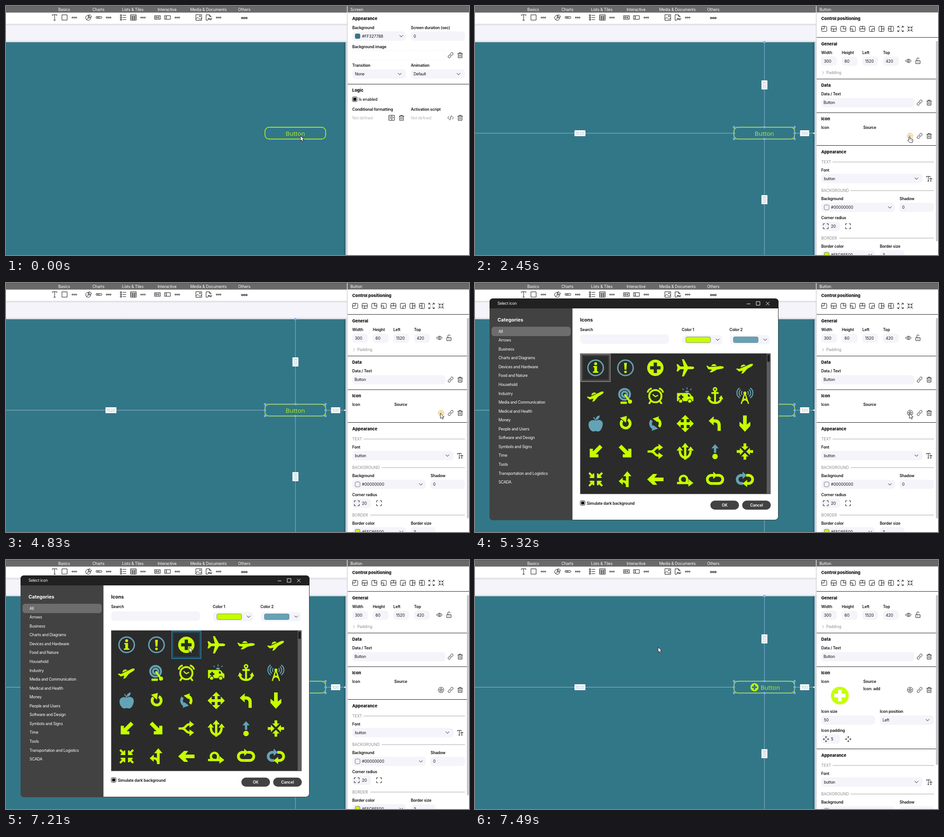
Recreate the animation shown at these times as an HTML page. Size 1019 by 549 pixels, loop 8 s.

```html
<!DOCTYPE html>
<html lang="en">
<head>
<meta charset="utf-8">
<title>Button icon picker</title>
<style>
html, body { margin: 0; width: 100%; height: 100%; overflow: hidden; background: #fff; }
svg { display: block; }
text { font: 400 8.6px Inter, sans-serif; letter-spacing: -.25px; fill: #111; white-space: pre; }
.n { letter-spacing: 0; }
.l { font-weight: 600; letter-spacing: -.15px; }
.m { font-weight: 500; letter-spacing: -.06px; }
.h { font-weight: 800; font-size: 9.2px; letter-spacing: -.05px; }
.H { font-weight: 700; font-size: 10.6px; letter-spacing: 0; }
.w { fill: #fff; }
.t { font-size: 8.7px; letter-spacing: -.13px; fill: #fff; }
.c { text-anchor: middle; }
.g { fill: #b4b4b8; }
.s { fill: #8c8c8c; letter-spacing: 0; }
.d { fill: #9fb2cf; letter-spacing: 0; text-anchor: middle; }
.b { font: 400 13.3px "Open Sans", sans-serif; letter-spacing: 0; fill: #bdf312; }
.i { fill: none; stroke: #161616; stroke-width: 1; stroke-linejoin: round; stroke-linecap: round; }
</style>
</head>
<body>
<svg id="stage" width="1019" height="549" viewBox="0 0 1019 549"></svg>
<script>
const LIME = '#c6ff00', BLUE = '#64a3b5', TEAL = '#327788', FIELD = '#f4f4fa', DARK = '#2b2b2b';

const text = (x, y, s, cls = '') =>
  `<text x="${x}" y="${y + 3.1}" class="${cls}">${s.replace(/&/g, '&amp;').replace(/</g, '&lt;')}</text>`;
const rect = (x, y, w, h, fill, r = 0, more = '') =>
  `<rect x="${x}" y="${y}" width="${w}" height="${h}" rx="${r}" fill="${fill}" ${more}/>`;
const fill = (d, c = LIME) => `<path d="${d}" fill="${c}" fill-rule="evenodd"/>`;
const line = (d, c = LIME, w = 6) => `<path d="${d}" fill="none" stroke="${c}" stroke-width="${w}"/>`;
const disc = (x, y, r, c = LIME) => `<circle cx="${x}" cy="${y}" r="${r}" fill="${c}"/>`;
const ring = (x, y, r, c = LIME, w = 3) =>
  `<circle cx="${x}" cy="${y}" r="${r}" fill="none" stroke="${c}" stroke-width="${w}"/>`;
const at = (x, y, s, more = '') => `<g transform="translate(${x} ${y}) ${more}">${s}</g>`;
const turn = (a, s) => `<g transform="rotate(${a})">${s}</g>`;
const flip = s => `<g transform="scale(-1 1)">${s}</g>`;
const group = (id, s) => `<g id="${id}">${s}</g>`;
const four = s => [0, 90, 180, 270].map(a => turn(a, s)).join('');

// Thin line icons, centred on 0,0
const icons = {
  chev: 'M-3.5-1.8L0 1.8L3.5-1.8',
  right: 'M-1.5-3L1.5 0L-1.5 3',
  trash: 'M-5.3-3.6H5.3M-2-3.6V-5.6H2V-3.6M-4.2-3.6V5.6H4.2V-3.6M-1.4-1V3.2M1.4-1V3.2',
  link: 'M-1.6 1.2a2.6 2.6 0 0 0 3.7 0l2.6-2.6a2.6 2.6 0 0 0-3.7-3.7l-1.2 1.2M1.6-1.2a2.6 2.6 0 0 0-3.7 0l-2.6 2.6a2.6 2.6 0 0 0 3.7 3.7l1.2-1.2',
  eye: 'M-6 0Q0-8 6 0Q0 8-6 0ZM-2 0a2 2 0 0 0 4 0a2 2 0 0 0-4 0',
  lock: 'M-4.5-.5H4.5V6H-4.5ZM-2.5-.5V-4A2.4 2.4 0 0 1 2.3-4.5M0 2V3.5',
  star: 'M-6 0a6 6 0 0 0 12 0a6 6 0 0 0-12 0M0-3.6L1.1-1.2L3.6-1L1.8.8L2.3 3.3L0 2L-2.3 3.3L-1.8.8L-3.6-1L-1.1-1.2Z',
  font: 'M-6-3.6V-5.3H2.4V-3.6M-1.8-5.3V5.2M-3.2 5.2H-.4M1.4.6V-.8H6V.6M3.7-.8V5.2M2.8 5.2H4.6',
  code: 'M-3.4-3L-6.4 0L-3.4 3M3.4-3L6.4 0L3.4 3M1.5-5L-1.5 5',
  cond: 'M-6-5.5H6V5.5H-6ZM0-5.5V5.5M-4.2-2H-2M-4.2 1H-2M2-2.5L4.2-.5L2 1.5',
  corner: 'M-5.5-2.3V-5.5H-2.3M2.3-5.5H5.5V-2.3M5.5 2.3V5.5H2.3M-2.3 5.5H-5.5V2.3',
  pad: 'M-1.8-4.2L0-6L1.8-4.2M0-6V-2.6M-1.8 4.2L0 6L1.8 4.2M0 6V2.6M-4.2-1.8L-6 0L-4.2 1.8M-6 0H-2.6M4.2-1.8L6 0L4.2 1.8M6 0H2.6',
  grow: 'M-6-3V-6H-3M3-6H6V-3M6 3V6H3M-3 6H-6V3M-6-6L-2-2M6-6L2-2M6 6L2 2M-6 6L-2 2',
  shrink: 'M-5-1.8H-1.8V-5M5-1.8H1.8V-5M-5 1.8H-1.8V5M5 1.8H1.8V5M-6-6L-2-2M6-6L2-2M6 6L2 2M-6 6L-2 2',
  T: 'M-5-4V-6H5V-4M0-6V6M-2 6H2',
  box: 'M-5.5-5.8H5.5V5.8H-5.5Z',
  pie: 'M-1-5A5.6 5.6 0 1 0 4.6 1L-1 1ZM1.2-6A5 5 0 0 1 6-1H1.2ZM-1 1L-4.6 4.8',
  bar: 'M-5-2H5Q6.5-2 6.5 0Q6.5 2 5 2H-5Q-6.5 2-6.5 0Q-6.5-2-5-2ZM-4 0H1',
  list: 'M-6-6H-3.4V-3.4H-6ZM-6-1.3H-3.4V1.3H-6ZM-6 3.4H-3.4V6H-6ZM-.8-4.7H6M-.8 0H6M-.8 4.7H6',
  table: 'M-6-6H6V6H-6ZM-6-3H6M-6 0H6M-6 3H6M-2-3V6M2-3V6',
  ok: 'M-6.2-4H6.2V4H-6.2ZM-4-1.6H-1.2V1.6H-4ZM1.4-2V2M4.2-2L1.6 0L4.2 2',
  input: 'M-6.2-4H6.2V4H-6.2ZM-3-2V2M-4-2H-2M-4 2H-2',
  image: 'M-6.2-6.2H6.2V6.2H-6.2ZM-6 3Q-3-2 0 2T6 1M1.4-2.8a1.2 1.2 0 0 0 2.4 0a1.2 1.2 0 0 0-2.4 0',
  pdf: 'M-2 6H-5.6V-6H1.5L5-2.5V-.5M1.5-6V-2.5H5M-1 5.5V2H.8V3.6H-1M2.5 2V5.5Q4.5 5.5 4.3 3.6Q4.2 2 2.5 2M6 5.5V2H7.2',
  dots: 'M-5.4 0a1.4 1.4 0 0 0 2.8 0a1.4 1.4 0 0 0-2.8 0M-1.4 0a1.4 1.4 0 0 0 2.8 0a1.4 1.4 0 0 0-2.8 0M2.6 0a1.4 1.4 0 0 0 2.8 0a1.4 1.4 0 0 0-2.8 0'
};
const icon = (name, x, y, more = '') => at(x, y, `<path class="i" d="${icons[name]}"/>`, more);

const field = (x, y, w, value = '', chevX = 0, textX = x + 6) =>
  rect(x, y - 10.3, w, 20.6, FIELD, 7) + text(textX, y, value, /\d/.test(value) ? 'n' : '') +
  (chevX ? icon('chev', chevX, y) : '');
const swatch = (x, y, c) => rect(x + .5, y - 5.3, 10.6, 10.6, c, 2.5, 'stroke="#555" stroke-width=".8"');
const rule = (y, x = 752, c = '#222') => rect(x, y - .5, (x > 752 ? 1010 : 1019) - x, 1, c);
const section = (y, s, x) => text(762, y, s, 's') + rule(y, x, '#a4a4a4');
const check = (x, y) => rect(x - 5.2, y - 5.2, 10.4, 10.4, '#fff', 2.5, 'stroke="#111" stroke-width="1"') +
  rect(x - 3.3, y - 3.3, 6.6, 6.6, '#000', 1);

// Editor
const menus = [[128, 'Basics'], [203.5, 'Charts'], [279, 'Lists & Tiles'], [354.5, 'Interactive'],
  [445.5, 'Media & Documents'], [524.5, 'Others']];
const tools = [['T', 107], ['box', 129], ['pie', 182], ['bar', 204.5], ['list', 258], ['table', 280.5],
  ['ok', 333.5], ['input', 355.5], ['image', 424.5], ['pdf', 446]];
const editor =
  rect(0, 0, 752, 549, FIELD) +
  rect(0, 39, 751, 5, 'url(#shade)') + rect(0, 76, 748, 4, 'url(#edge)') +
  rect(0, 15, 751, 24.5, '#fff') +
  rect(0, 80, 747.5, 469, TEAL) + rect(743.5, 80, 4, 469, '#2b6678') +
  rect(747.5, 78, 3.5, 471, '#d3d8de') +
  rect(0, 0, 1019, 14.5, '#696969') + rect(0, 0, 1019, 1, '#555') +
  menus.map(([x, s]) => text(x, 7.5, s, 't c')).join('') +
  tools.map(([n, x]) => icon(n, x, 25.3)).join('') +
  [150.5, 226, 301.5, 377, 468].map(x => icon('dots', x, 25.5)).join('') +
  icon('dots', 524.5, 26.5, 'scale(1.2)') +
  rect(570, 267.4, 133.6, 26, 'none', 9, 'stroke="#bdf312" stroke-width="1.6"') +
  rect(752, 14.5, 267, 535, '#fff') + rect(750.5, 0, 1, 549, '#c4c4c8') + rect(750.5, 0, 1, 14.5, '#eee');

// Plus badge
const plus = fill('M-18 0a18 18 0 0 0 36 0a18 18 0 0 0-36 0ZM-3.6-11.5H3.6V-3.6H11.5V3.6H3.6V11.5H-3.6V3.6H-11.5V-3.6H-3.6Z');

const caption = text(636.8, 282.7, 'Button', 'b c');
const captionIcon = at(615.2, 280.5, plus, 'scale(.5)') + text(628.7, 282.7, 'Button', 'b');

// Selection guides
const tag = (x, y, s, a = 0) => at(x, y, rect(-10 - (s.length - 3) * 2, -6.5, 20 + (s.length - 3) * 4, 13, '#fff') +
  text(0, .2, s, 'd'), `rotate(${a})`);
const handle = (x, y) => rect(x - 2.2, y - 2.2, 4.4, 4.4, '#7db0e6');
const guides =
  rect(636.5, 79, 1, 188, '#86b8e0') + rect(636.5, 294, 1, 255, '#94b3c8') +
  rect(0, 280, 570, 1, '#94b9c6') + rect(704, 280, 42, 1, '#94b9c6') +
  rect(570, 267.2, 133.5, 26, 'none', 0, 'stroke="#94bedd" stroke-width=".9"') +
  tag(231, 280.5, '1520') + tag(725.5, 280.5, '100') + tag(637, 174, '420', 90) + tag(637, 427, '600', 90) +
  [570, 637, 703.3].flatMap(x => [267.2, 280.5, 293.3].map(y => x == 637 && y == 280.5 ? '' : handle(x, y))).join('') +
  handle(637, 79.5) + disc(746, 280.5, 1.8, '#f2f5fa');

// Right panel: nothing selected
const screenPanel =
  text(758, 8, 'Screen', 't') + text(762, 28.3, 'Appearance', 'h') +
  text(762, 47.5, 'Background', 'l') + text(891, 47.5, 'Screen duration (sec)', 'l') +
  field(762, 66.5, 118.5, '#FF327788', 870, 783.5) + swatch(768, 66.5, TEAL) + field(891, 66.5, 119, '0') +
  text(762, 89.5, 'Background image', 'l') +
  rect(762, 98.5, 205, 20, '#fff', 7, 'stroke="#ececf0" stroke-dasharray="2 2"') +
  icon('link', 978.5, 108.5) + icon('trash', 999.5, 108.5) +
  text(762, 131.3, 'Transition', 'l') + text(891, 131.3, 'Animation', 'l') +
  field(762, 150, 118.5, 'None', 866.5) + field(891, 150, 119, 'Default', 996) + rule(172.3) +
  text(762, 186.3, 'Logic', 'h') + check(767.6, 205.6) + text(776, 206, 'Is enabled', 'm') +
  text(762, 228.3, 'Conditional formatting', 'l') + text(891, 228.3, 'Activation script', 'l') +
  text(762, 247, 'Not defined', 'g') + text(891, 247, 'Not defined', 'g') +
  icon('cond', 849, 246.5) + icon('trash', 870.5, 246.5) + icon('code', 978.5, 246.5) + icon('trash', 999.5, 246.5);

// Right panel: button selected
const anchors = ['M0-6V0H-6', 'M-6 0H6M0 0V6', 'M0-6V0H6', 'M-6 0H0V6', 'M-6 0H6M0-6V0', 'M0 6V0H6', 'M0-6V6M0 0H6', 'M0-6V6M-6 0H0'];
const numbers = [[762, 'Width', '300'], [807.3, 'Height', '60'], [852.5, 'Left', '1520'], [898, 'Top', '420']];
const lower =
  rule(307.5) + text(762, 322, 'Appearance', 'h') + section(344, 'TEXT', 787) +
  text(762, 362, 'Font', 'l') + field(762, 380.5, 223, 'button', 971.5) + icon('font', 999.5, 381) +
  section(407, 'BACKGROUND', 827) + text(762, 424.7, 'Background', 'l') + text(934.5, 424.7, 'Shadow', 'l') +
  field(762, 444, 162, '#00000000', 913, 783.5) + swatch(768, 444, FIELD) + field(934, 444, 76, '0') +
  text(762, 466.7, 'Corner radius', 'l') + field(762, 485.7, 41.5, '20', 0, 783.5) +
  icon('corner', 772, 485.5) + icon('corner', 821, 485.5) +
  section(511.7, 'BORDER', 802) + text(762, 529.5, 'Border color', 'l') + text(891, 529.5, 'Border size', 'l') +
  field(762, 548.5, 118.5, '#FFC6FF00', 870, 783.5) + swatch(768, 548.5, LIME) + field(891, 548.5, 54, '3');
const iconFields =
  text(854.5, 283.5, 'Icon: add', 'l') + at(803, 299, plus, 'scale(1.09)') +
  text(762, 334, 'Icon size', 'l') + text(891, 334, 'Icon position', 'l') +
  field(762, 353, 118.5, '50') + field(891, 353, 119, 'Left', 996) +
  text(762, 376, 'Icon padding', 'l') + field(762, 395, 41.5, '5', 0, 783.5) +
  icon('pad', 772.5, 395) + icon('pad', 821.5, 395);
const buttonPanel =
  text(758, 8, 'Button', 't') + text(762, 28.3, 'Control positioning', 'h') +
  anchors.map((d, i) => at(768.5 + 21 * i, 50.5,
    rect(-5.6, -5.6, 11.2, 11.2, 'none', 1.5, 'class="i"') + `<path class="i" d="${d}"/>`)).join('') +
  icon('grow', 936.5, 50.5) + icon('shrink', 957.5, 50.5) + rule(69.3) +
  text(762, 83.7, 'General', 'h') +
  numbers.map(([x, s, v]) => text(x, 102.5, s, 'l') + field(x, 121.8, 34.5, v)).join('') +
  icon('eye', 954, 121) + icon('lock', 975, 121) +
  at(766, 147, `<path class="i" style="stroke:#999" d="${icons.right}"/>`) + text(773, 147, 'Padding', 's') + rule(161) +
  text(762, 175, 'Data', 'h') + text(762, 194, 'Data / Text', 'l') + field(762, 213.3, 205, 'Button', 0, 767) +
  icon('link', 978.5, 213) + icon('trash', 999.5, 213) + rule(235.2) +
  text(762, 249.2, 'Icon', 'h') + text(762, 268, 'Icon', 'l') + text(854.5, 268, 'Source', 'l') +
  group('star', icon('star', 957.5, 286.5)) + icon('link', 978.5, 286.5) + icon('trash', 999.5, 286.5) +
  group('iconFields', iconFields) + group('lower', lower) +
  `<rect id="thumb" x="1014.5" y="77" width="4" height="442" rx="2" fill="#c3c3c7"/>`;

// Icon library
const arrow = 'M-4-18H4V2L12-4V5L0 18L-12 5V-4L-4 2Z';
const diag = 'M-13 13V-6H-6V0L9-15L15-9L0 6H6V13Z';
const jet = fill('M-19-4Q-17-6-13-2L5-3Q16-5 19-2Q20 1 15 2L4 4L-7 10H-12L-7 4L-15 3Z') + fill('M-9-4L-5-8H0L4-4Z');
const swirl = c => line('M-8-7A11 11 0 0 0-4 10', c, 6) + fill('M-8 16L6 11L-5 3Z', c);
const fork = line('M-17 0H-10Q-5 0-1-5T9-9', LIME, 5) + fill('M7-17L17-9L7-2Z');
const sideUp = line('M0 14Q11 12 12-2', LIME, 5) + fill('M5-2L12-11L19-2Z');
const halfLoop = 'M3-9H8A8 8 0 0 1 8 9H0', otherHalf = 'M-4 9H-8A8 8 0 0 1-8-9H-2';
const wave = (x, r) => line(`M${x}-${r}A${r + 2} ${r + 2} 0 0 0 ${x} ${r}`, BLUE, 2.2);
const waves = at(0, -6, wave(-6, 4) + wave(-9, 7.5) + wave(-11.5, 11));

const library = [
  ring(0, 0, 17, BLUE) + disc(0, -9, 3.2) + fill('M-5-4H3V8H6V11H-6V8H-3V-1H-5Z'),
  ring(0, 0, 17, BLUE) + fill('M-3-11H3L2 4H-2Z') + disc(0, 9, 2.8),
  plus,
  fill('M20 0Q19 3 14 3H6L-3 19H-7L-3 3H-11L-16 8H-19L-17 0L-19-8H-16L-11-3H-3L-7-19H-3L6-3H14Q19-3 20 0Z'),
  jet, at(0, 0, jet, 'rotate(-20)'), at(0, 0, flip(jet), 'scale(-1 1) rotate(22)'),
  disc(-2, -3, 14, BLUE) + ring(-2, -3, 9, DARK, 1.6) + disc(-2, -3, 3.5, DARK) + line('M-2-3L10 13', LIME, 4) +
    disc(10, 13, 4.5) + rect(-11, 13, 14, 5, LIME, 1),
  ring(0, 1, 13.5, LIME, 4) + line('M-6-3L0 2L6-1', LIME, 2.4) + line('M-17-7A11 11 0 0 1-8-16M17-7A11 11 0 0 0 8-16M-10 12L-14 18M10 12L14 18', LIME, 4),
  fill('M-18-6H7Q11-6 13-1L18 3V12H-18ZM6-3V2H11L9-3ZM-11-2V1H-14V5H-11V8H-7V5H-4V1H-7V-2Z') + disc(-10, 12, 5, DARK) +
    disc(-10, 12, 3.6) + disc(10, 12, 5, DARK) + disc(10, 12, 3.6) + rect(0, -11, 8, 4, BLUE, 2) +
    line('M-3-13L-6-15M4-14V-18M11-13L14-15', BLUE, 2),
  ring(0, -14, 3.5, LIME, 3) + line('M0-10V16M-8-6H8', LIME, 4) + line('M-14 4Q-12 16 0 16Q12 16 14 4', LIME, 4.5) +
    fill('M-18 8L-14-1L-8 6ZM18 8L14-1L8 6Z'),
  waves + flip(waves) + disc(0, -6, 3.2) + line('M0-6L-8 18M0-6L8 18M-4 6L6 12M4 6L-6 12', LIME, 2.6),
  fill('M0-6Q8-11 14-5Q18 1 13 11Q9 19 3 17Q0 16-3 17Q-9 19-14 10Q-18 0-13-5Q-7-10 0-6Z', BLUE) +
    fill('M0-8Q0-17 9-18Q9-9 0-8Z', BLUE) + line('M0-6Q-1-11-5-14', BLUE, 2),
  line('M-7-7A10 10 0 1 0 5-9', LIME, 6) + fill('M-12-13L3-17L1-2Z'),
  swirl(BLUE) + turn(180, swirl(LIME)),
  four(fill('M-3 0V-10H-9L0-19L9-10H3V0Z')),
  line('M9 16V4Q9-6-1-6H-5', LIME, 7) + fill('M-3-16L-14-6L-3 4Z'),
  fill(arrow), fill(diag), flip(fill(diag)),
  fork + `<g transform="scale(1 -1)">${fork}</g>`,
  line('M0 18V-10', LIME, 5) + fill('M-8-9L0-19L8-9Z') + sideUp + flip(sideUp),
  fill('M-2.5 3V-7H-8L0-16L8-7H2.5V3Z', BLUE) + disc(0, 11, 6),
  four(fill('M-8-11L0-3L8-11H3V-18H-3V-11Z')),
  four(fill('M-3-3V-13H-6.5L-6.5-10L-13-16L-16-13L-10-6.5H-13V-3Z')),
  line('M4 17V-8', LIME, 6) + fill('M-5-7L4-18L13-7Z') + line('M4 15Q3 4-7 4', LIME, 5) + fill('M-6-4L-15 4L-6 12Z'),
  turn(90, fill(arrow)),
  line('M-18 8H8M-3 8A8 8 0 1 1 4 2Q4 8-1 8', LIME, 5) + fill('M7-1L18 8L7 16Z'),
  line(halfLoop) + line(otherHalf) + line('M-4 9H2') + fill('M-4-17V-1L5-9Z'),
  line(halfLoop) + line(otherHalf, BLUE) + fill('M5 1V17L-5 9Z') + fill('M-5-17V-1L4-9Z', BLUE)
];
const cellX = i => 265.5 + 65.7 * i, cellY = j => 187 + 61.5 * j;
const cell = (i, edge, tint) => at(cellX(i), cellY(0),
  rect(-32.2, -30.3, 64.4, 60.6, tint, 0, `stroke="${edge}"`) + rect(-28, -26, 56, 52, DARK));

// Dialog
const categories = ['All', 'Arrows', 'Business', 'Charts and Diagrams', 'Devices and Hardware', 'Food and Nature',
  'Household', 'Industry', 'Media and Communication', 'Medical and Health', 'Money', 'People and Users',
  'Software and Design', 'Symbols and Signs', 'Time', 'Tools', 'Transportation and Logistics', 'SCADA'];
const colorField = (x, c) => field(x, 125, 88, '', x + 78) + rect(x + 8, 118.8, 54.5, 12.6, c, 3, 'stroke="#667" stroke-width=".7"');
const pill = (x, s) => rect(x, 479.7, 63, 20, '#424242', 10) + text(x + 31.5, 490, s, 'l w c');
const dialog =
  rect(32.5, 34.5, 635, 488, '#fff', 8, 'stroke="#333"') +
  fill('M32 56V42Q32 34 40 34H660Q668 34 668 42V56Z', '#212121') +
  fill('M32 56H214.5V523H40Q32 523 32 515Z', '#424242') +
  text(49.5, 45, 'Select icon', 'w') +
  line('M598 46H606M619 41H627V49H619ZM640.5 41.5L648 49M648 41.5L640.5 49', '#fff', 1) +
  text(49.5, 81.7, 'Categories', 'H w') + rect(37, 97, 173, 19.6, '#6d6d6d', 5, 'stroke="#7d7d7d" stroke-width=".7"') +
  categories.map((s, i) => text(51.8, 106.6 + 19.55 * i, s, 'w')).join('') +
  text(231.3, 81.7, 'Icons', 'H') + text(231.3, 103.3, 'Search', 'l') + text(455, 103.3, 'Color 1', 'l') + text(560, 103.3, 'Color 2', 'l') +
  field(231.5, 123.8, 195.5) + colorField(456, LIME) + colorField(560.7, BLUE) +
  rect(231.8, 155.5, 418.4, 309.5, DARK, 0, 'stroke="#555" stroke-width=".8"') +
  rect(642, 156, 8, 308.5, '#5d5d5d') + rect(643.3, 158, 5.4, 16, '#1d1d1d', 2) +
  group('first', cell(0, '#b5b5b5', '#444')) + group('picked', cell(2, '#2f9fd0', '#1f4859')) +
  library.map((s, k) => at(cellX(k % 6), cellY(Math.floor(k / 6)), s)).join('') +
  check(237, 485) + text(246, 485.5, 'Simulate dark background', 'l') + pill(518, 'OK') + pill(588, 'Cancel');

const pointer = d => `<path d="${d}" fill="#fff" stroke="#111" stroke-width=".9" stroke-linejoin="round"/>`;
const cursor =
  group('arrow', pointer('M0 0V11.5L2.7 9.2L4.6 13.2L6.6 12.3L4.8 8.4H8.2Z')) +
  group('hand', pointer('M-1 9V1.4Q.1-.6 1.3 1.4V5.6Q3 4.8 3.6 6Q5.2 5.4 5.8 6.6Q7.6 6.2 7.7 8.2Q7.8 11 6.6 14H.6L-3.8 9.6Q-3.6 7.4-1 9Z') +
    line('M3.5 8V10M5.5 8.3V10', '#111', .6));

const fade = (id, a, b) => `<linearGradient id="${id}" x2="0" y2="1"><stop stop-color="${a}"/><stop offset="1" stop-color="${b}"/></linearGradient>`;
document.getElementById('stage').innerHTML =
  fade('shade', '#d2d2d8', FIELD) + fade('edge', FIELD, '#c6d0d8') + editor +
  group('screenPanel', screenPanel) + group('buttonPanel', buttonPanel) +
  group('caption', caption) + group('captionIcon', captionIcon) + group('guides', guides) +
  group('dialog', dialog) + group('cursor', cursor);

const el = id => document.getElementById(id);
const show = (id, on) => { el(id).style.display = on ? '' : 'none'; };
const starPath = el('star').querySelector('path');

// Pointer moves: start, duration, from, to, upward bow
const moves = [[910, 840, 648, 286, 956, 287, 8.5], [5810, 840, 956, 287, 403, 192, 0]];
function pointerAt(t) {
  const [start, span, x0, y0, x1, y1, bow] = moves[t < 5810 ? 0 : 1];
  const p = Math.min(1, Math.max(0, (t - start) / span));
  const e = 1 - (1 - p) ** 3;
  return [x0 + (x1 - x0) * e, y0 + (y1 - y0) * e - bow * 4 * e * (1 - e)];
}

function draw(t) {
  const selected = t >= 210, added = t >= 7490;
  const hover = t >= 1820 && t < 5320, hand = t >= 1820 && t < 4830;
  show('screenPanel', !selected);
  show('buttonPanel', selected);
  show('guides', selected);
  show('caption', !added);
  show('captionIcon', added);
  show('iconFields', added);
  el('lower').setAttribute('transform', `translate(0 ${added ? 109 : 0})`);
  el('thumb').setAttribute('height', added ? 375 : 442);
  starPath.style.stroke = hover ? '#dba22c' : '';
  show('dialog', t >= 5320 && t < 7280);
  show('first', t < 7140);
  show('picked', t >= 7140);
  show('arrow', !hand);
  show('hand', hand);
  const [x, y] = pointerAt(Math.floor(t / 70) * 70);
  el('cursor').setAttribute('transform', `translate(${x.toFixed(2)} ${y.toFixed(2)})`);
}

const begin = performance.now();
function tick() {
  draw((performance.now() - begin) % 8000);
  requestAnimationFrame(tick);
}
tick();
</script>
</body>
</html>
```
